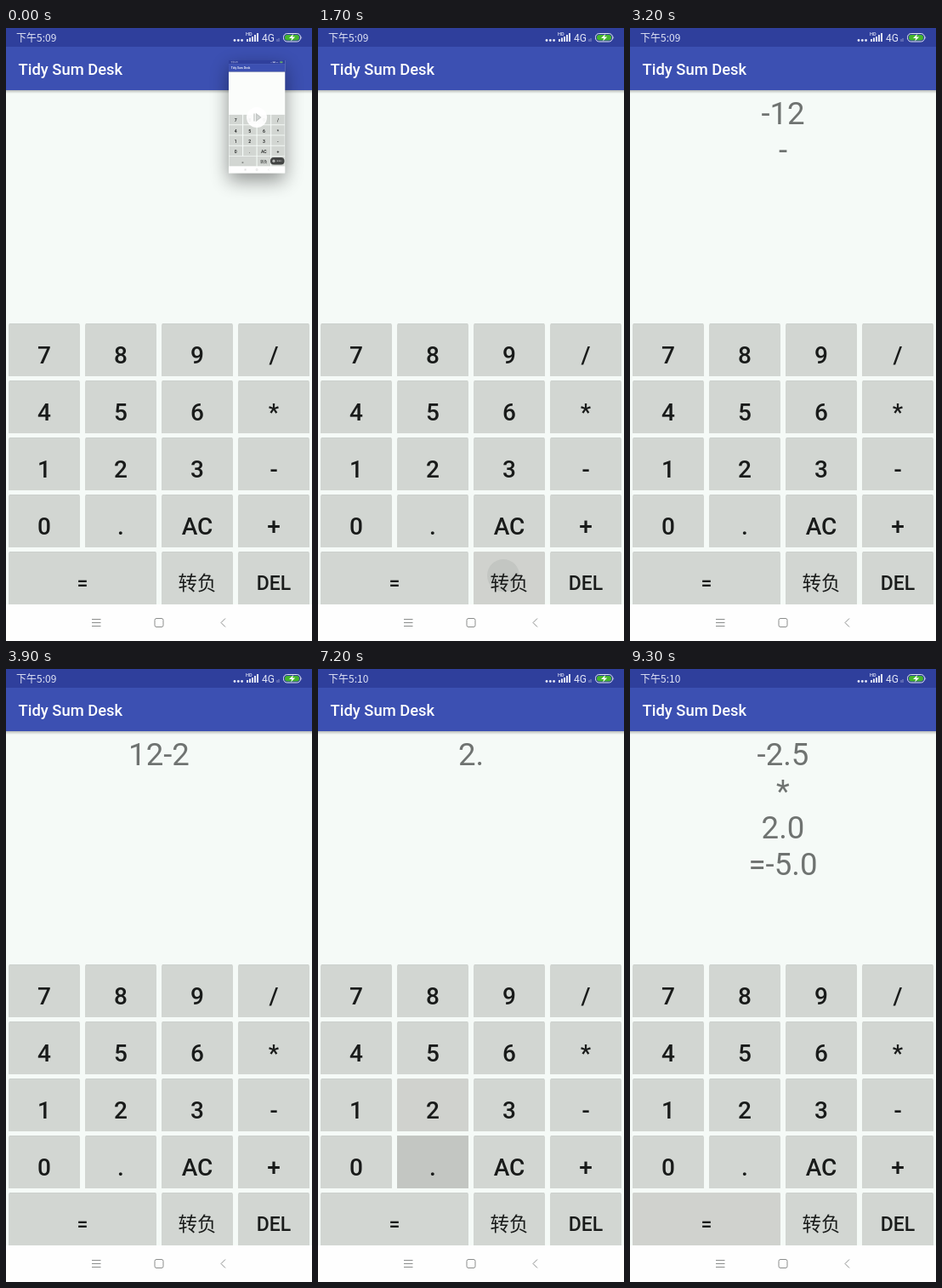
These frames come from a looping animation (360x720 px, 10 s). An HTML page:

```html
<!DOCTYPE html>
<html lang="zh">
<head>
<meta charset="utf-8">
<title>Tidy Sum Desk</title>
<style>
  html, body { margin: 0; width: 100%; height: 100%; overflow: hidden; background: #f5faf7; }
  svg { display: block; }
  #stage { width: 100%; height: 100%; }
  text { font-family: Roboto, "Noto Sans CJK SC", "Noto Sans CJK", sans-serif; }
  .clock { font: 12px "Noto Sans CJK SC", "Noto Sans CJK", sans-serif; }
  #labels text { font-weight: 500; fill: #191b1a; text-anchor: middle; }
  #labels .cjk { font-weight: 400; }
  #display text { font-size: 36.6px; fill: #6f7371; text-anchor: middle; }
</style>
</head>
<body>
<svg id="stage" viewBox="0 0 360 720">
  <defs>
    <linearGradient id="edge" x2="0" y2="1">
      <stop stop-color="#000" stop-opacity=".25"/>
      <stop offset="1" stop-color="#000" stop-opacity="0"/>
    </linearGradient>
    <filter id="soft" x="-60%" y="-40%" width="220%" height="180%">
      <feGaussianBlur stdDeviation="11"/>
    </filter>
  </defs>
  <g id="app">
    <rect width="360" height="720" fill="#f5faf7"/>
    <rect width="360" height="22" fill="#2f3f9c"/>
    <rect y="22" width="360" height="51" fill="#3c50b2"/>
    <rect y="73" width="360" height="4" fill="url(#edge)"/>
    <text x="14.5" y="55" font-size="18.4" font-weight="500" fill="#fff">Tidy Sum Desk</text>
    <g fill="#e3e6f6">
      <text id="clock" class="clock" x="12" y="16"></text>
      <circle cx="269" cy="14.5" r="1.4"/><circle cx="273.3" cy="14.5" r="1.4"/><circle cx="277.6" cy="14.5" r="1.4"/>
      <text x="282" y="9" font-size="5.6" font-weight="500">HD</text>
      <path d="M283 13h2v3h-2zM286 11.5h2v4.5h-2zM289 10h2v6h-2zM292 8h2v8h-2zM295 6h2v10h-2z"/>
      <text x="301" y="16" font-size="12">4G</text>
      <path d="M318.5 13h1v3h-1zM320.5 12h1v4h-1z" opacity=".5"/>
    </g>
    <rect x="326.5" y="6.5" width="20" height="9.5" rx="4.2" fill="#2f3f9c" stroke="#dfe4ee"/>
    <rect x="328" y="8" width="17" height="6.5" rx="3" fill="#45b52d"/>
    <path d="M347.5 9.5q1.4 1.7 0 3.4z" fill="#dfe4ee"/>
    <path d="M338 7l-5 5h3.2l-1 3.6 5-5.2H337z" fill="#fff"/>
    <g id="keys"></g>
    <g id="touches"></g>
    <g id="labels"></g>
    <rect y="677" width="360" height="43" fill="#fefefe"/>
    <g fill="none" stroke="#8b8d8c" stroke-width="1">
      <path d="M101 694.5h10.5M101 698.5h10.5M101 702.5h10.5"/>
      <rect x="175" y="693.5" width="10" height="10" rx="2"/>
      <path d="M258 693.5l-5 5 5 5"/>
    </g>
  </g>
  <g id="display"></g>
  <g id="preview">
    <rect x="262" y="46" width="66" height="133" filter="url(#soft)" opacity=".42"/>
    <use href="#app" transform="translate(262 38) scale(.1839)"/>
    <rect x="262" y="52" width="66.2" height="50" fill="#fff" opacity=".6"/>
    <circle cx="295" cy="105" r="12" fill="#fff" opacity=".93"/>
    <path d="M292 100.5v9M294.5 101l5 4-5 4z" fill="#d4d7d5" stroke="#c3c7c5" stroke-width="1.3"/>
    <rect x="311" y="152" width="16.5" height="8.5" rx="4" fill="#434544"/>
    <circle cx="315" cy="156.2" r="1.6" fill="#b9bbba"/>
    <path d="M318.5 156.2h6" stroke="#aaa" stroke-width="1.2" stroke-dasharray="2 .7"/>
  </g>
</svg>
<script>
const LOOP = 10000, STEP = 100;
const $ = id => document.getElementById(id);

const rows = [
  ['7', '8', '9', '/'],
  ['4', '5', '6', '*'],
  ['1', '2', '3', '-'],
  ['0', '.', 'AC', '+'],
  ['=', null, '转负', 'DEL']
];
const keys = {};
rows.forEach((row, r) => row.forEach((name, c) => {
  if (!name) return;
  keys[name] = { x: 3 + 90 * c, y: 347 + 67 * r, w: name === '=' ? 174 : 84, h: 62, row: r };
}));

$('keys').innerHTML = Object.values(keys).map(({ x, y, w, h }) =>
  `<path d="M${x} ${y + h}v${2 - h}q0-2 2-2h${w - 4}q2 0 2 2v${h - 2}z" fill="#d2d6d2"/>
   <path d="M${x + 1} ${y + .5}h${w - 2}" stroke="#c9cecb" stroke-width=".7"/>`).join('');

$('labels').innerHTML = Object.entries(keys).map(([name, k]) => {
  const last = k.row === 4;
  const size = name === '转负' ? 22.5 : last ? 23 : 28;
  return `<text class="${name === '转负' ? 'cjk' : ''}" x="${k.x + k.w / 2}" y="${last ? 660 : 394 + 67 * k.row}" font-size="${size}">${name}</text>`;
}).join('');

// Start time and the lines shown from then on.
const screens = [
  [0, ''], [2300, '1'], [2600, '12'], [3200, '-12\n-'], [3800, '12-2'],
  [4200, '-12\n-\n2\n=-14'], [5300, ''], [6700, '2'], [7000, '2.'], [7300, '2.5'],
  [7900, '-2.5\n*'], [8300, '2.5*2'], [8800, '-2.5\n*\n2.0\n=-5.0']
];

// Start, end, key, ripple centre and radius; no radius leaves only the faint tint.
const touches = [
  [1700, 1800, '转负', 218, 643, 19],
  [1800, 2300, '转负'],
  [2300, 2500, '1', 42, 514, 36],
  [2500, 2700, '1'],
  [2600, 2700, '2', 135, 514, 38],
  [3300, 3600, '-'],
  [3800, 3900, '2', 135, 514, 38],
  [4200, 4300, '=', 88, 647, 37],
  [4300, 4700, '='],
  [5300, 6000, 'AC', 212, 585, 34],
  [6300, 6700, '转负', 216, 643, 33],
  [6700, 6800, '2', 135, 514, 34],
  [6800, 7300, '2'],
  [7000, 7100, '.', 135, 582, 32],
  [7100, 7300, '.', 135, 580, 80],
  [7900, 8300, '*', 312, 446, 31],
  [8300, 8400, '2', 135, 514, 36],
  [8800, 8900, '=', 88, 647, 37],
  [8900, 9000, '=', 88, 647, 70],
  [9000, LOOP, '=']
];

function touchMarkup([, , name, cx, cy, radius]) {
  const { x, y, w, h } = keys[name];
  const ripple = radius ? `<circle cx="${cx - x}" cy="${cy - y}" r="${radius}" fill="#c3c6c2"/>` : '';
  return `<svg x="${x}" y="${y}" width="${w}" height="${h}">
    <rect width="${w}" height="${h}" rx="2" fill="#d0d2ce"/>${ripple}</svg>`;
}

function draw(time) {
  $('clock').textContent = time < 5500 ? '下午5:09' : '下午5:10';
  const lines = screens.filter(s => s[0] <= time).pop()[1].split('\n');
  $('display').innerHTML = lines.map((line, i) => `<text x="180" y="${113 + 43 * i}">${line}</text>`).join('');
  $('touches').innerHTML = touches.filter(t => t[0] <= time && time < t[1]).map(touchMarkup).join('');

  const exit = Math.min(time / 800, 1);
  $('preview').setAttribute('transform', `translate(0 ${-235 * exit * exit})`);
  $('preview').style.display = exit < 1 ? '' : 'none';
}

const start = performance.now();
let shown = -1;
function tick() {
  const elapsed = (performance.now() - start) % LOOP;
  const time = Math.floor(elapsed / STEP) * STEP;
  if (time !== shown) draw(shown = time);
  requestAnimationFrame(tick);
}
tick();
</script>
</body>
</html>
```
